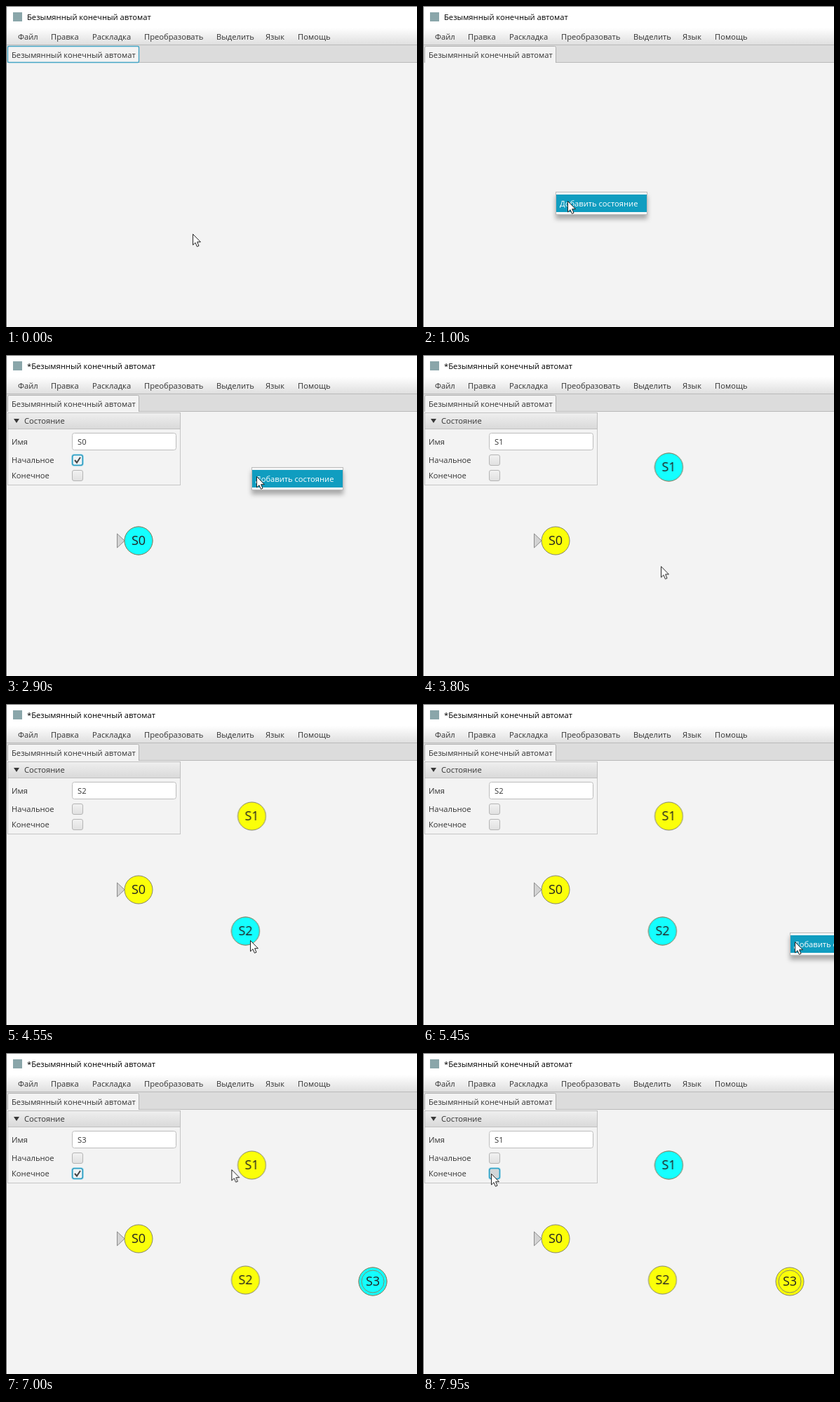
Animation of 586 by 458 pixels, one loop 8000 ms. Source, as an HTML page:

```html
<!DOCTYPE html>
<html lang="ru">
<head>
<meta charset="utf-8">
<title>Конечный автомат</title>
<style>
  html, body { margin: 0; width: 100%; height: 100%; overflow: hidden; background: #f3f3f3; }
  svg { display: block; width: 586px; height: 458px; }
  text { font: 11.2px "Open Sans", "Noto Sans", sans-serif; fill: #333; }
  .title text { fill: #000; }
  .node text { font-size: 18px; text-anchor: middle; fill: #222; }
  .node circle { stroke: #85856a; }
  .yellow { fill: #fbff0a; }
  .cyan { fill: #14ffff; }
  .ring { fill: none; }
  .box { fill: url(#button); stroke: #b4b4b4; }
  .focus { fill: #eef3f5; stroke: #2f9fc4; stroke-width: 1.6; }
  .halo { fill: none; stroke: #a9dbea; }
  .pressed { fill: #d2d6d8; }
  .tick { fill: none; stroke: #444; stroke-width: 2; }

  /* hard switches */
  .tabFocus, .untitled, .edited, .menu, .hover, .sel0, .sel1, .sel2, .sel3,
  .add1, .add2, .add3, .initial, .initialFocus, .final, .finalFocus, .finalPress {
    animation: 8s step-end infinite;
  }
  .tabFocus { animation-name: tabFocus; }
  .untitled { animation-name: untitled; }
  .edited { animation-name: edited; }
  .menu { animation-name: menu; filter: drop-shadow(0 6px 3px rgba(0, 0, 0, .3)); }
  .hover { animation-name: hover; }
  .sel0 { animation-name: sel0; }
  .sel1 { animation-name: sel1; }
  .sel2 { animation-name: sel2; }
  .sel3 { animation-name: sel3; }
  .add1 { animation-name: add1; }
  .add2 { animation-name: add2; }
  .add3 { animation-name: add3; }
  .initial { animation-name: initial-on; }
  .initialFocus { animation-name: initialFocus; }
  .final { animation-name: final-on; }
  .finalFocus { animation-name: finalFocus; }
  .finalPress { animation-name: finalPress; }
  .cursor { animation: cursor 8s ease-in-out infinite; }

  @keyframes tabFocus { 0% { opacity: 1 } 8.75%, 100% { opacity: 0 } }
  @keyframes untitled { 0% { opacity: 1 } 15%, 100% { opacity: 0 } }
  @keyframes edited { 0% { opacity: 0 } 15%, 100% { opacity: 1 } }
  @keyframes sel0 { 0% { opacity: 0 } 15% { opacity: 1 } 37%, 100% { opacity: 0 } }
  @keyframes sel1 { 0% { opacity: 0 } 37% { opacity: 1 } 56% { opacity: 0 } 89.5%, 100% { opacity: 1 } }
  @keyframes sel2 { 0% { opacity: 0 } 56% { opacity: 1 } 69.5%, 100% { opacity: 0 } }
  @keyframes sel3 { 0% { opacity: 0 } 69.5% { opacity: 1 } 89.5%, 100% { opacity: 0 } }
  @keyframes add1 { 0% { opacity: 0 } 37%, 100% { opacity: 1 } }
  @keyframes add2 { 0% { opacity: 0 } 56%, 100% { opacity: 1 } }
  @keyframes add3 { 0% { opacity: 0 } 69.5%, 100% { opacity: 1 } }
  @keyframes initial-on { 0% { opacity: 0 } 23%, 100% { opacity: 1 } }
  @keyframes initialFocus { 0% { opacity: 0 } 23% { opacity: 1 } 37%, 100% { opacity: 0 } }
  @keyframes final-on { 0% { opacity: 0 } 81%, 100% { opacity: 1 } }
  @keyframes finalFocus { 0% { opacity: 0 } 81% { opacity: 1 } 89.5%, 100% { opacity: 0 } }
  @keyframes finalPress { 0% { opacity: 0 } 98.5%, 100% { opacity: 1 } }
  @keyframes hover {
    0% { opacity: 0 } 11% { opacity: 1 } 15% { opacity: 0 } 34.5% { opacity: 1 }
    37% { opacity: 0 } 54.2% { opacity: 1 } 56% { opacity: 0 } 66.6% { opacity: 1 }
    69.5%, 100% { opacity: 0 }
  }
  @keyframes menu {
    0% { opacity: 0; transform: translate(189px, 265px) }
    8.75% { opacity: 1 }
    15% { opacity: 0 }
    32.5% { opacity: 1; transform: translate(350px, 160px) }
    37% { opacity: 0 }
    52% { opacity: 1; transform: translate(341px, 324px) }
    56% { opacity: 0 }
    65.625% { opacity: 1; transform: translate(523px, 326px) }
    69.5%, 100% { opacity: 0; transform: translate(523px, 326px) }
  }
  @keyframes cursor {
    0%, 1.5% { transform: translate(266px, 325px) }
    8%, 10% { transform: translate(189px, 265px) }
    12.5%, 16% { transform: translate(206px, 278px) }
    21.5% { transform: translate(99px, 150px) }
    23%, 26% { transform: translate(95px, 155px) }
    31.5%, 33.75% { transform: translate(350px, 160px) }
    36% { transform: translate(357px, 173px) }
    42% { transform: translate(357px, 173px); animation-timing-function: ease-in }
    47.5% { transform: translate(339px, 301px); animation-timing-function: ease-out }
    50%, 53.5% { transform: translate(341px, 324px) }
    55.5%, 57.5% { transform: translate(348px, 337px) }
    63.5%, 65.7% { transform: translate(523px, 326px) }
    67.5%, 70.5% { transform: translate(530px, 339px) }
    79.5% { transform: translate(98px, 172px) }
    82.5% { transform: translate(98px, 172px); animation-timing-function: ease-in }
    87.5% { transform: translate(321px, 166px); animation-timing-function: ease-out }
    88.75%, 90.5% { transform: translate(341px, 164px) }
    96.9% { transform: translate(117px, 174px) }
    98.5%, 100% { transform: translate(97px, 172px) }
  }
</style>
</head>
<body>
<svg viewBox="0 0 586 458">
  <defs>
    <linearGradient id="bar" x2="0" y2="1"><stop stop-color="#fff"/><stop offset="1" stop-color="#dedede"/></linearGradient>
    <linearGradient id="head" x2="0" y2="1"><stop stop-color="#efefef"/><stop offset="1" stop-color="#d9d9d9"/></linearGradient>
    <linearGradient id="button" x2="0" y2="1"><stop stop-color="#f2f2f2"/><stop offset="1" stop-color="#e0e0e0"/></linearGradient>
    <g id="checkbox"><rect class="box" x=".5" y=".5" width="15" height="15" rx="2.5"/></g>
    <g id="focusbox">
      <rect class="halo" x="-.5" y="-.5" width="17" height="17" rx="3.5"/>
      <rect class="focus" x=".8" y=".8" width="14.4" height="14.4" rx="2.5"/>
    </g>
    <path id="tick" class="tick" d="M4 8L7 11.5L12 4"/>
  </defs>

  <rect width="586" height="458" fill="#f3f3f3"/>

  <g class="title">
    <rect width="586" height="32" fill="#fff"/>
    <rect x="10" y="9" width="13" height="13" fill="#8aa6aa"/>
    <text class="untitled" x="30" y="20">Безымянный конечный автомат</text>
    <text class="edited" x="30" y="20">*Безымянный конечный автомат</text>
  </g>

  <rect y="31" width="586" height="25" fill="url(#bar)"/>
  <text y="48"><tspan x="17">Файл</tspan><tspan x="64">Правка</tspan><tspan x="123">Раскладка</tspan><tspan x="197">Преобразовать</tspan><tspan x="300">Выделить</tspan><tspan x="370">Язык</tspan><tspan x="416">Помощь</tspan></text>

  <rect y="55" width="586" height="26" fill="#dcdcdc"/>
  <path d="M0 55.5H586M190 80.5H586" stroke="#bababa"/>
  <path d="M2.5 81V59.5Q2.5 57.5 4.5 57.5H187.5Q189.5 57.5 189.5 59.5V81" fill="#f3f3f3" stroke="#b0b0b0"/>
  <rect class="tabFocus" x="2.5" y="57.5" width="187" height="23" rx="1.5" fill="none" stroke="#46a6c6" stroke-width="1.4"/>
  <text x="8" y="74">Безымянный конечный автомат</text>
  <path d="M0 .5H586M.5 0V458" stroke="#666"/>

  <g class="edited">
    <rect x="2.5" y="82.5" width="246" height="103" fill="#f3f3f3" stroke="#c6c6c6"/>
    <rect x="2.5" y="82.5" width="246" height="23" fill="url(#head)" stroke="#c0c0c0"/>
    <path d="M11 91H19L15 97Z" fill="#383838"/>
    <text x="26" y="98">Состояние</text>
    <text y="128" x="8">Имя</text>
    <text y="154" x="8">Начальное</text>
    <text y="176" x="8">Конечное</text>
    <rect x="94.5" y="111.5" width="148" height="24" rx="3" fill="#fff" stroke="#bdbdbd"/>
    <text class="sel0" x="102" y="128">S0</text>
    <text class="sel1" x="102" y="128">S1</text>
    <text class="sel2" x="102" y="128">S2</text>
    <text class="sel3" x="102" y="128">S3</text>
    <g transform="translate(94 142)">
      <use href="#checkbox"/>
      <g class="initialFocus"><use href="#focusbox"/><use href="#tick"/></g>
    </g>
    <g transform="translate(94 164)">
      <use href="#checkbox"/>
      <g class="finalFocus"><use href="#focusbox"/><use href="#tick"/></g>
      <g class="finalPress">
        <use href="#focusbox"/>
        <rect class="pressed" x="2" y="2" width="12" height="12" rx="1"/>
      </g>
    </g>
  </g>

  <g class="node edited" transform="translate(189 265)">
    <path class="initial" d="M-30.5 -10V10L-20 0Z" fill="#d3d3d3" stroke="#8c8c8c"/>
    <circle class="yellow" r="20"/>
    <circle class="cyan sel0" r="20"/>
    <text y="6">S0</text>
  </g>
  <g class="node add1" transform="translate(350.5 160)">
    <circle class="yellow" r="20"/>
    <circle class="cyan sel1" r="20"/>
    <text y="6">S1</text>
  </g>
  <g class="node add2" transform="translate(341.5 324)">
    <circle class="yellow" r="20"/>
    <circle class="cyan sel2" r="20"/>
    <text y="6">S2</text>
  </g>
  <g class="node add3" transform="translate(523 326)">
    <circle class="yellow" r="20"/>
    <circle class="cyan sel3" r="20"/>
    <circle class="ring final" r="16"/>
    <text y="6">S3</text>
  </g>

  <g class="menu">
    <rect x=".5" y=".5" width="130" height="32" fill="#f7f7f7" stroke="#bcbcbc"/>
    <text x="6" y="21">Добавить состояние</text>
    <g class="hover">
      <rect x="1" y="4" width="129" height="25" fill="#109dc0"/>
      <text x="6" y="21" style="fill:#fff">Добавить состояние</text>
    </g>
  </g>

  <path class="cursor" d="M.5 .5V16L4 12.7L6.4 18.3L9 17.2L6.6 11.7H11.4Z" fill="#fff" stroke="#222"/>
</svg>
</body>
</html>
```
